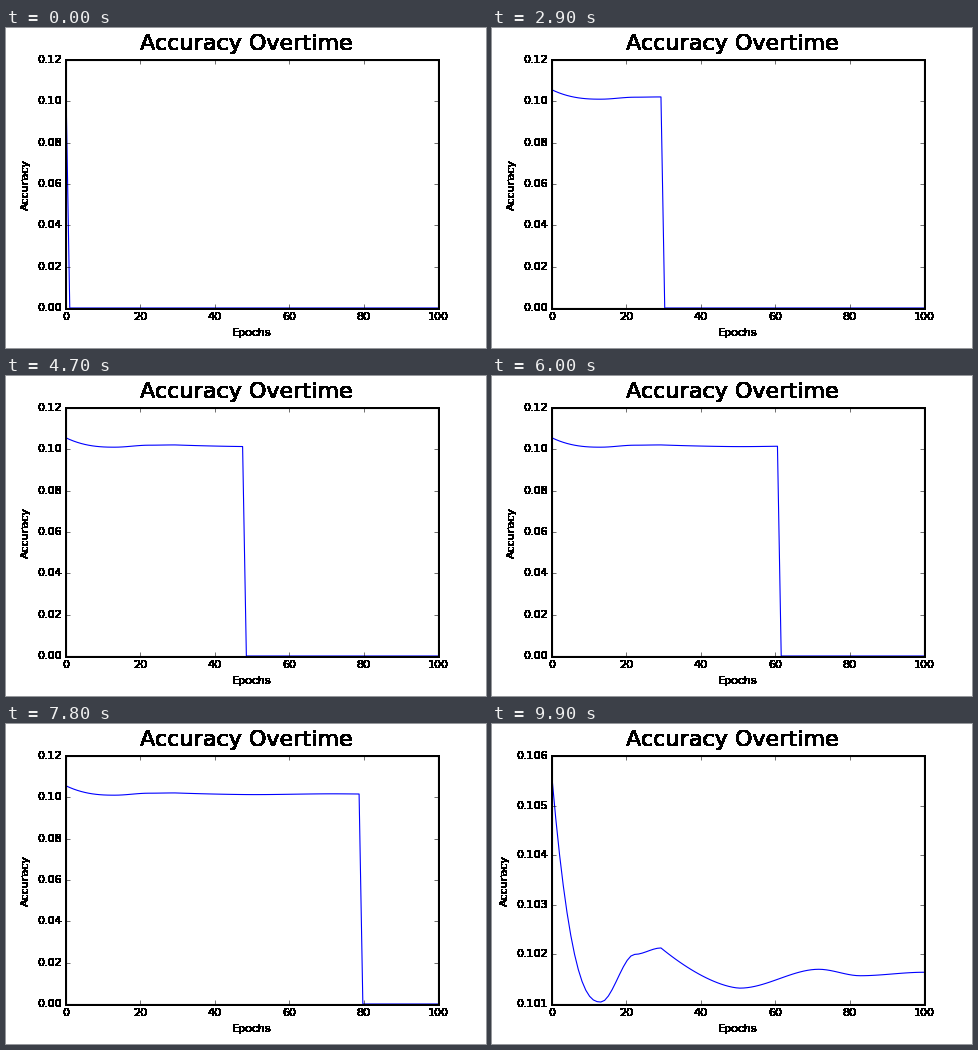
Animation of 480 by 320 pixels, one loop 10000 ms. Source, as a matplotlib script:

```python
import matplotlib.pyplot as plt
import numpy as np
from matplotlib.animation import FuncAnimation
from matplotlib.patches import Rectangle

W, H, DPI = 480, 320, 80
STEPS = 100

plt.style.use("classic")
plt.rcParams.update({
    "font.family": "DejaVu Sans",
    "font.size": 10,
    "figure.facecolor": "white",
    "savefig.facecolor": "white",
    "savefig.dpi": "figure",
    "axes.formatter.useoffset": False,
})


def smooth(u):
    return u * u * (3 - 2 * u)


def settle(power):
    return lambda u: 1 - (1 - u) ** power


# Turning points of the curve: step, accuracy, easing towards the point
START = 0.10556
TURNS = [
    (13, 0.10104, settle(2.5)),
    (22, 0.10200, smooth),
    (29, 0.10213, smooth),
    (50, 0.10132, settle(1.6)),
    (71, 0.10170, smooth),
    (82, 0.10157, smooth),
    (99, 0.10164, smooth),
]


def training_curve():
    values = np.full(STEPS, START)
    first, level = 0, START
    for last, goal, ease in TURNS:
        u = np.linspace(0, 1, last - first + 1)
        values[first:last + 1] = level + (goal - level) * ease(u)
        first, level = last, goal
    return values


epochs = np.linspace(0, 100, STEPS)
accuracy = training_curve()


def solid_ink(image, dpi):
    """Turn every touched pixel fully black."""
    ink = np.zeros_like(image)
    ink[..., 3] = image[..., 3] > 0
    return ink, 0, 0


fig = plt.figure(figsize=(W / DPI, H / DPI), dpi=DPI)
fig.subplots_adjust(left=0.125, right=0.9, bottom=0.125, top=0.9)

# Dark backing that thickens the frame on its outer side
fig.add_artist(Rectangle((59 / W, 38 / H), 375 / W, 251 / H, fc="black", lw=0,
                         transform=fig.transFigure, zorder=-1))

ax = fig.add_subplot()
title = fig.suptitle("Accuracy Overtime", fontsize=20)
ax.set_xlabel("Epochs")
ax.set_ylabel("Accuracy")
ax.set_xlim(0, 100)
line, = ax.plot(epochs, np.zeros(STEPS), color="b", lw=1)


def set_scale(low, high, ticks):
    ax.set_yticks(np.linspace(low, high, ticks))
    ax.set_ylim(low, high)


set_scale(0, 0.12, 7)
for text in [title, ax.xaxis.label, ax.yaxis.label,
             *ax.get_xticklabels(), *ax.get_yticklabels()]:
    text.set_agg_filter(solid_ink)


def update(step):
    line.set_ydata(np.where(np.arange(STEPS) <= step, accuracy, 0))
    if step < STEPS - 1:
        set_scale(0, 0.12, 7)
    else:
        set_scale(0.101, 0.106, 6)
    return line,


anim = FuncAnimation(fig, update, frames=STEPS, interval=100, repeat=True,
                     repeat_delay=0, blit=False)
plt.show()
```
